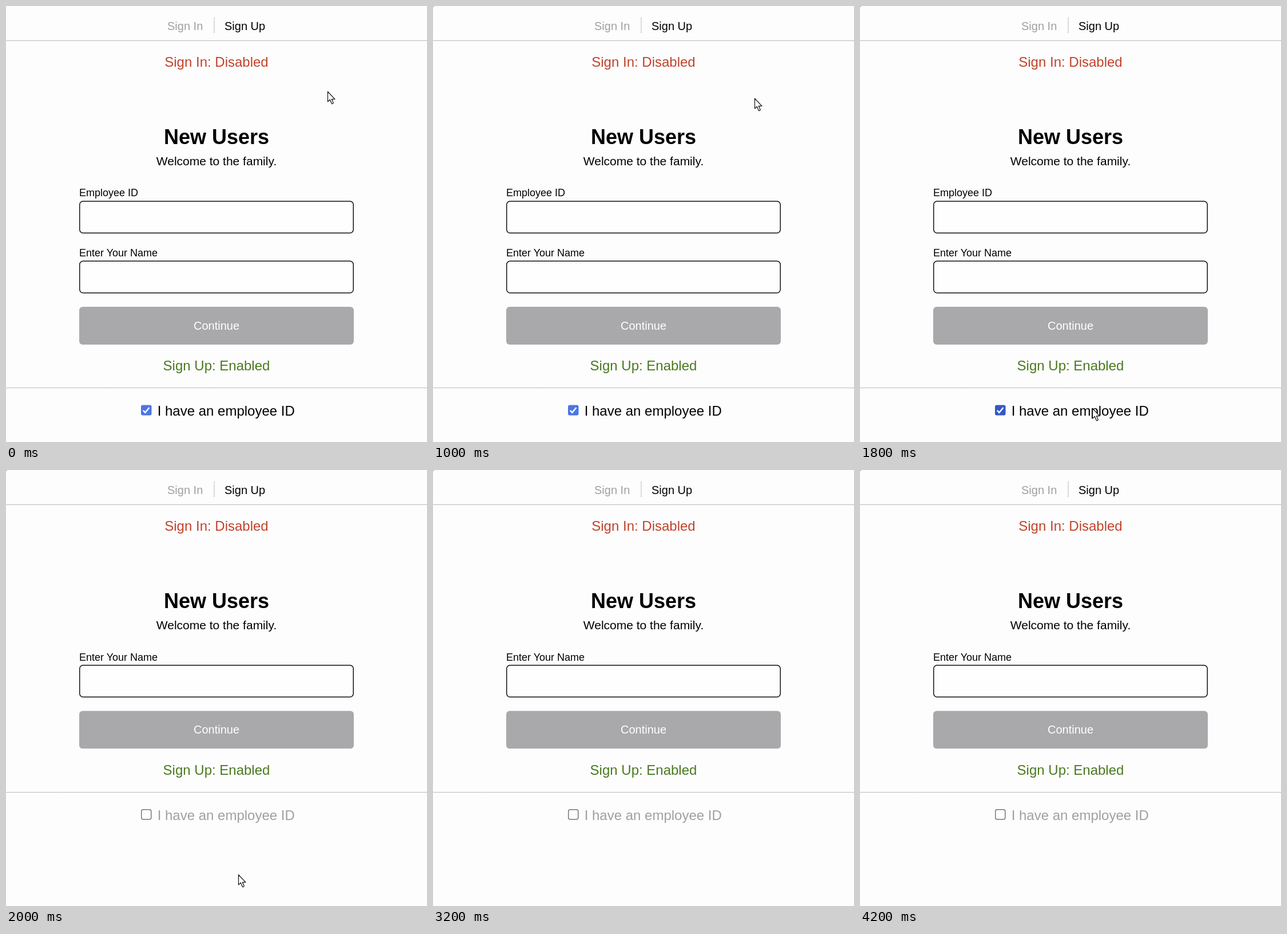
These frames come from a looping animation (736 by 761 pixels, 4.4 s). An HTML page:

```html
<!DOCTYPE html>
<html lang="en">
<head>
<meta charset="utf-8">
<title>Sign up form</title>
<style>
  html, body { margin: 0; width: 100%; height: 100%; overflow: hidden; background: #fdfdfd; }
  svg { display: block; width: 736px; height: 761px; font: 20px "Liberation Sans", Arial, sans-serif; }
  .mid { text-anchor: middle; }
  .big { font-size: 24px; }
  .small { font-size: 18px; }
  .muted { fill: #a0a0a0; }
  .dots { stroke: #777; stroke-dasharray: 1 1; }
  .field { fill: #fefefe; stroke: #111; stroke-width: 1.5; }

  /* Everything switches in hard steps within one loop. */
  .anim { animation: 4400ms step-end infinite; }
  .form { --dy: -104.5px; animation-name: rise; }
  .foot { --dy: -104px; animation-name: rise; }
  .on { animation-name: on; }
  .off { animation-name: off; }
  .tick { animation-name: hover; }
  .dot { animation-name: dot; }
  .arrow { animation-name: point; }
  .beam { animation-name: beam; }

  @keyframes rise { 0% { transform: none; } 45.45%, 100% { transform: translateY(var(--dy)); } }
  @keyframes on { 0% { visibility: visible; } 45.45%, 100% { visibility: hidden; } }
  @keyframes off { 0% { visibility: hidden; } 45.45%, 100% { visibility: visible; } }
  @keyframes hover { 0% { fill: #4c75e6; } 40.9%, 100% { fill: #3558c8; } }
  @keyframes dot { 0% { visibility: hidden; } 4.54%, 100% { visibility: visible; } }
  @keyframes beam {
    0% { visibility: hidden; }
    27.27% { visibility: visible; }
    31.81%, 100% { visibility: hidden; }
  }
  @keyframes point {
    0% { transform: translate(562px, 149px); visibility: visible; }
    18.18% { transform: translate(562px, 150px); }
    22.72% { transform: translate(562px, 161px); visibility: visible; }
    27.27% { transform: translate(472px, 384px); visibility: hidden; }
    31.81% { transform: translate(425px, 589px); visibility: visible; }
    36.36% { transform: translate(425px, 633px); }
    40.9% { transform: translate(406px, 702px); }
    45.45% { transform: translate(406px, 706px); }
    50% { transform: translate(432.5px, 514.5px); visibility: visible; }
    72.72%, 100% { transform: translate(432.5px, 514.5px); visibility: hidden; }
  }
</style>
</head>
<body>
<svg viewBox="0 0 736 761">
  <rect class="anim dot" width="1" height="1"/>

  <text class="muted" x="282" y="42">Sign In</text>
  <path class="dots" d="M364 20V48"/>
  <text x="382" y="42">Sign Up</text>
  <path class="dots" d="M1 60.5H736"/>
  <text class="mid big" x="368" y="106" fill="#bf432c">Sign In: Disabled</text>

  <text class="mid" x="368" y="241" font-size="36" font-weight="700">New Users</text>
  <text class="mid" x="368" y="278" style="font-size:21px">Welcome to the family.</text>

  <g class="anim on">
    <text class="small" x="128" y="332">Employee ID</text>
    <rect class="field" x="128.75" y="340.75" width="478.5" height="55.5" rx="6"/>
  </g>

  <g class="anim form">
    <text class="small" x="128" y="437">Enter Your Name</text>
    <rect class="field" x="128.75" y="445.25" width="478.5" height="55.5" rx="6"/>
    <rect x="128" y="525" width="480" height="66" rx="6" fill="#a9a9ab"/>
    <text class="mid" x="368" y="564.5" fill="#fff">Continue</text>
  </g>

  <g class="anim foot">
    <text class="mid big" x="368" y="636" fill="#4a7a20">Sign Up: Enabled</text>
    <path class="dots" d="M1 666.5H736"/>
    <g class="anim on">
      <rect class="anim tick" x="236" y="696.5" width="18.5" height="18" rx="3"/>
      <path d="M239.8 705.8L243.4 709.6L250.4 701" fill="none" stroke="#fff" stroke-width="2.4"/>
      <text class="big" x="264.7" y="715">I have an employee ID</text>
    </g>
    <g class="anim off">
      <rect x="236.75" y="696.75" width="17" height="17" rx="3" fill="#fff" stroke="#767676" stroke-width="1.5"/>
      <text class="big muted" x="264.7" y="715">I have an employee ID</text>
    </g>
  </g>

  <path class="anim beam" d="M471.5 384.5H475L476 385.5L477 384.5H480.5M476 385.5V402.5M471.5 403.5H475L476 402.5L477 403.5H480.5" fill="none" stroke="#111" stroke-width="1.2"/>
  <path class="anim arrow" d="M.5 .5V18L4.4 14.4L7.4 21.4Q8.8 22.4 10.3 20.2L7.3 13.6H13Z" fill="#fff" stroke="#111" stroke-width="1.2" stroke-linejoin="round"/>
</svg>
</body>
</html>
```
